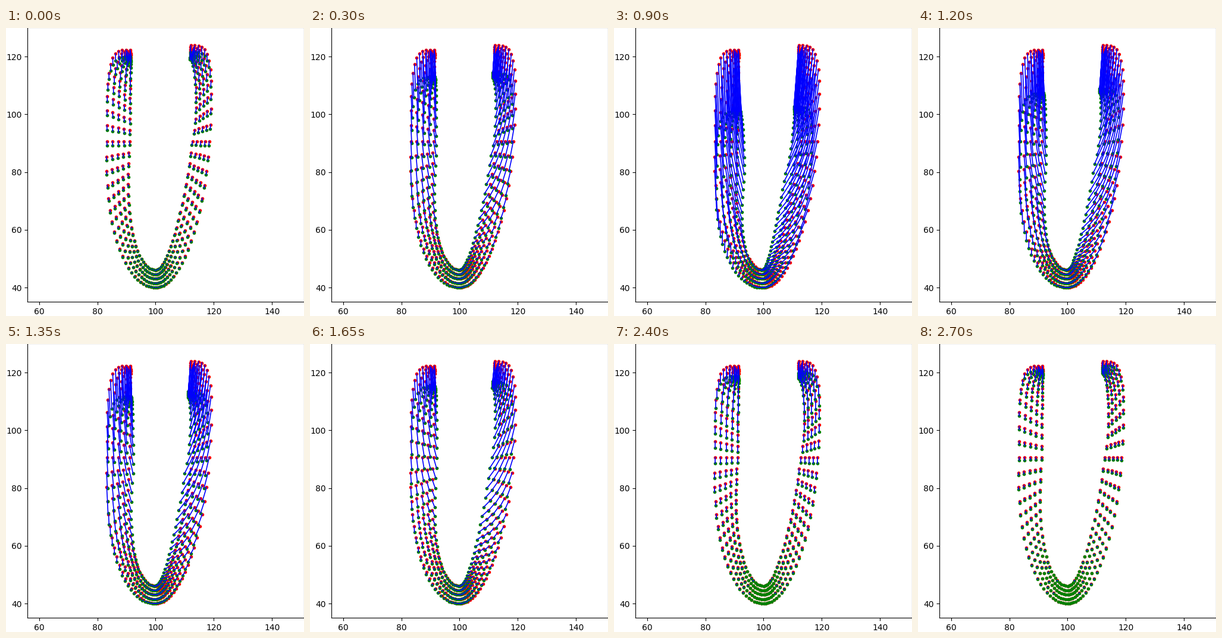
A matplotlib script that plays this animation: 501 px wide and 485 px high, repeating every 2850 ms.

```python
import numpy as np
import matplotlib.pyplot as plt
from matplotlib.animation import FuncAnimation
from matplotlib.collections import LineCollection

W, H, DPI = 501, 485, 100
FRAMES, INTERVAL = 19, 150
LEFT, BOTTOM, AX_W, AX_H = 36.06, 23.6, 465, 462
X_LIM, Y_LIM = (56, 151), (35, 130)

LAYERS = 5
LOWER_ROWS, UPPER_ROWS = 22, 12   # apex to widest part, widest part to base
APEX_X, WAIST_Y = 251.4, 190.7

row = np.arange(LOWER_ROWS + UPPER_ROWS + 1)
low = np.clip(row / LOWER_ROWS, 0, 1)
up = np.clip((row - LOWER_ROWS) / UPPER_ROWS, 0, 1)


def bowl(width, flare, depth, crowding):
    """Lower half: an ellipse whose rows crowd together at the apex."""
    angle = np.pi / 2 * (crowding * low + (1 - crowding) * low**2)
    c = np.cos(angle)
    return (width + flare * c) * np.sin(angle), WAIST_Y + depth * c


def outer_wall(width, flare, height, reach, bulge):
    """Bowl closed by a rounded cap that bends inwards at the base."""
    x, y = bowl(width, flare, 246, 0.515)
    turn = np.pi / 2 * (3 * up**2 - 2 * up**3)
    keep = np.sqrt(np.abs(np.cos(turn)))
    x = x - reach * (1 - keep) + bulge * np.sqrt(up) * keep
    return np.array([x, y - height * np.sqrt(np.sin(turn))])


def inner_wall(width, flare, height, taper, bulge):
    """Bowl continued by a nearly straight wall."""
    x, y = bowl(width, flare, 216.5, 0.767)
    x = x - taper * up + bulge * np.sin(np.pi * up**0.7)
    return np.array([x, y - height * np.sin(np.pi / 2 * up)])


def side(sign, outer, inner, outer_shift, inner_shift):
    """Rest position and full-contraction travel of one half of the wall."""
    depth = np.linspace(0, 1, LAYERS)[:, None]

    def blend(a, b):
        return a + (b - a) * depth

    x, y = (blend(a, b) for a, b in zip(outer, inner))
    rise = (y[:, :1] - y) / np.ptp(y, axis=1, keepdims=True)
    base, swing = (blend(a, b) for a, b in zip(outer_shift, inner_shift))
    arch = np.abs(np.sin(np.pi * rise)) ** 0.6
    dx = -4 + (base + 4) * rise + swing * arch
    dy = blend(103, 95) * rise**1.1
    return np.array([APEX_X + sign * x, y, dx, dy])


left = side(-1, outer_wall(82, 10, 154.5, 39, 0), inner_wall(44, 16, 146, 2.5, 0),
            outer_shift=(3, 3), inner_shift=(2, 12))
right = side(1, outer_wall(90, -13, 162, 31, 8), inner_wall(62, -22, 149, 4, 8),
             outer_shift=(-8, -7), inner_shift=(-7, -20))
rest_x, rest_y, travel_x, travel_y = (
    np.concatenate([left[:, :, :0:-1], right], axis=2).reshape(4, -1))


def to_data(x, y):
    """Stage pixels (y down) to axis units."""
    return np.column_stack([
        X_LIM[0] + (x + 0.2 - LEFT) * np.ptp(X_LIM) / AX_W,
        Y_LIM[0] + (H - BOTTOM - y - 0.5) * np.ptp(Y_LIM) / AX_H])


def pulse(t, peak, rise, fall):
    """Smooth bump that is zero outside its rise and fall."""
    d = (t - peak) / (rise if t < peak else fall)
    return np.cos(np.pi / 2 * min(abs(d), 1)) ** 2


def shortening(t):
    return 0.05 + 0.95 * pulse(t, 6, 7.2, 5) + 0.29 * pulse(t, 11.5, 4.5, 8)


def narrowing(t):
    return pulse(t, 6, 7, 5) + 0.46 * pulse(t, 10.7, 3, 4.5)


fig = plt.figure(figsize=((W + 1e-6) / DPI, (H + 1e-6) / DPI), dpi=DPI)
ax = fig.add_axes([LEFT / W, BOTTOM / H, AX_W / W, AX_H / H])
ax.set(xlim=X_LIM, ylim=Y_LIM)

start = to_data(rest_x, rest_y)
ax.plot(*start.T, "r.", zorder=2)
moved, = ax.plot([], [], "g.", zorder=3)
trails = LineCollection([], colors="b", linewidths=1.2, capstyle="projecting", zorder=4)
ax.add_collection(trails, autolim=False)


def draw(frame):
    end = to_data(rest_x + travel_x * narrowing(frame),
                  rest_y + travel_y * shortening(frame))
    moved.set_data(*end.T)
    trails.set_segments(np.stack([start, end], axis=1))
    return moved, trails


anim = FuncAnimation(fig, draw, frames=FRAMES, interval=INTERVAL,
                     repeat=True, repeat_delay=0)
plt.show()
```
